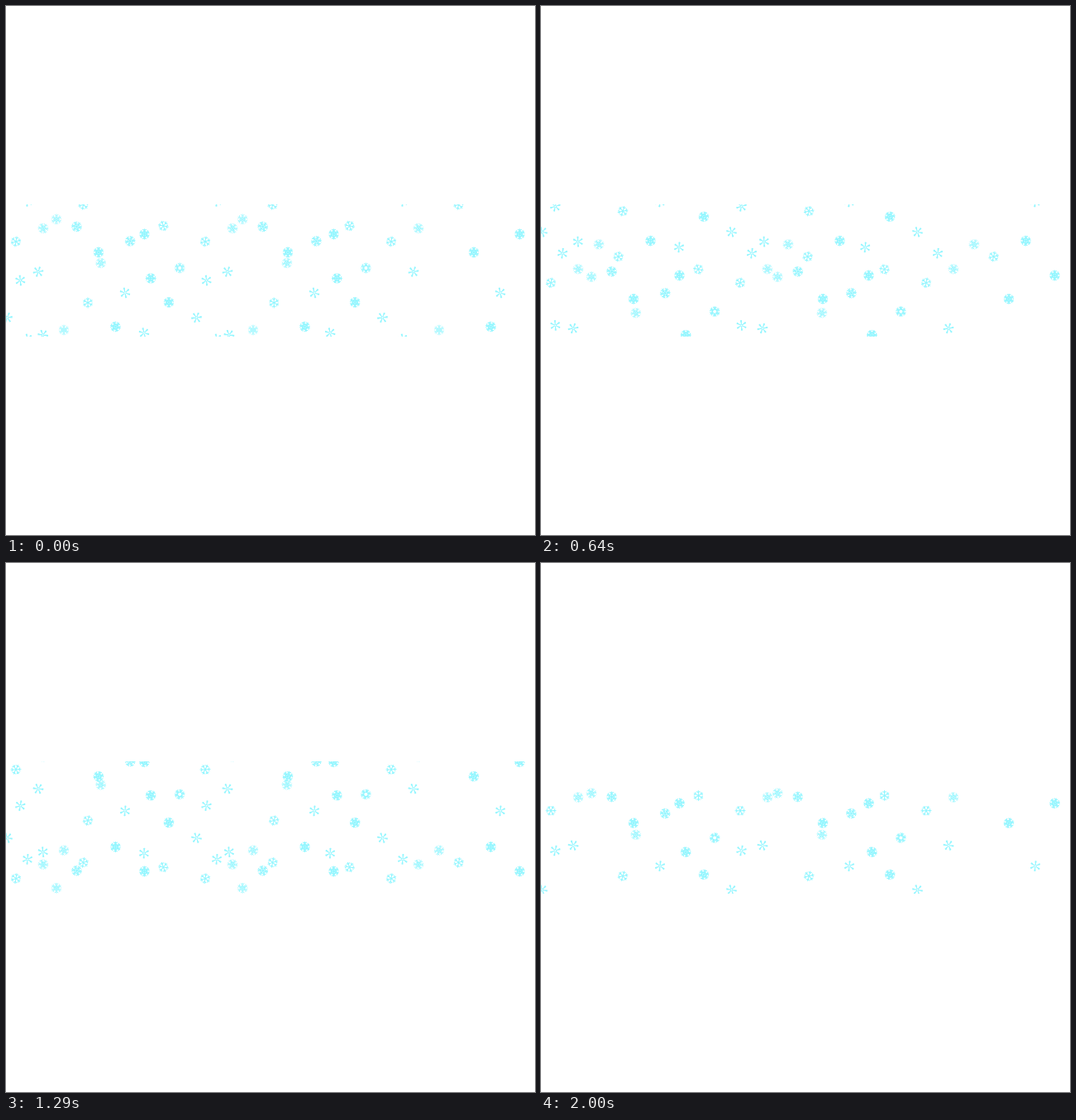
Recreate the animation shown at these times as an HTML page with a canvas. Size 640 by 640 pixels, loop 2.07 s.

```html
<!DOCTYPE html>
<html>
<head>
<meta charset="utf-8">
<style>
html, body { margin: 0; width: 100%; height: 100%; overflow: hidden; background: #fff; }
canvas { display: block; }
</style>
</head>
<body>
<canvas id="stage" width="640" height="640"></canvas>
<script>
const ctx = document.getElementById('stage').getContext('2d');
const LOOP = 2070, STEP = 500 / 7, CYCLE = 45, SPIN = 3.6;

// Each flake: x, y at the start, fall per tick, kind, angle in degrees
const tripled = [
  [1.5, 377, 3.7, 'spokes', 23],
  [12, 285, 2.93, 'branched', 11],
  [26, 402.8, 3.7, 'spokes', 48],
  [39, 321.5, 4.03, 'spokes', 19],
  [45, 269, 2.9, 'lacy', 36],
  [70, 392, 3.7, 'lacy', 0],
  [93.6, 406.8, 3.7, 'branched', -5],
  [112, 298, 3.32, 'dense', 0],
  [132.5, 388, 3.71, 'dense', 43],
  [144, 347, 3.93, 'spokes', 48],
  [167.5, 276, 2.94, 'dense', 0]
];
const doubled = [
  [17.3, 332, 3.2, 'spokes', -6],
  [44.7, 398, 4.03, 'spokes', 38],
  [61, 258, 4.1, 'lacy', 1],
  [85.5, 267, 3.19, 'star', 42],
  [99, 359, 3.957, 'branched', -1],
  [114.7, 311, 3.55, 'lacy', 20],
  [150.2, 284.5, 3.7, 'star', 20],
  [167, 395.5, 3.7, 'spokes', 46],
  [175.2, 329.5, 4.03, 'dense', 30],
  [190.4, 266, 3.09, 'branched', 41],
  [197, 358.5, 3.7, 'dense', 0],
  [210.2, 317, 3.1, 'ring', 0]
];

// Per kind: line width, inner start, distances of the side twigs, hexagon radius
const kinds = {
  spokes: [1.1, 0.8, [], 0],
  branched: [1, 0, [3.7], 0],
  star: [1, 0, [2, 4.2], 0],
  dense: [1.1, 0, [2, 4.2], 3],
  lacy: [0.7, 0, [2, 4.2], 2.4],
  ring: [0.95, 1.8, [2.4, 4.2], 3]
};

function makePath([, inner, twigs, hexagon]) {
  const path = new Path2D();
  const polar = (r, a) => [r * Math.sin(a), -r * Math.cos(a)];
  const line = (p, q) => { path.moveTo(...p); path.lineTo(...q); };
  for (let i = 0; i < 6; i++) {
    const a = i * Math.PI / 3;
    line(polar(inner, a), polar(6.4, a));
    for (const r of twigs)
      for (const side of [-0.38, 0.38]) line(polar(r, a), polar(r + 1.9, a + side));
    if (!twigs.length)
      for (const side of [-0.1, 0.1]) line(polar(3, a), polar(6.2, a + side));
    if (hexagon) line(polar(hexagon, a), polar(hexagon, a + Math.PI / 3));
  }
  return path;
}
const paths = {};
for (const kind in kinds) paths[kind] = makePath(kinds[kind]);

function drawFlake(x, y, kind, angle) {
  if (y < 231 || y > 409) return;
  ctx.save();
  ctx.translate(x, y);
  ctx.rotate(angle * Math.PI / 180);
  ctx.lineWidth = kinds[kind][0];
  ctx.stroke(paths[kind]);
  ctx.restore();
}

function drawGroup(flakes, offsets, tick) {
  for (const [x, y, speed, kind, angle] of flakes)
    for (const dx of offsets)
      for (const age of [tick, tick - CYCLE])
        drawFlake(x + dx, y + speed * age, kind, angle + SPIN * age);
}

function frame(now) {
  const step = Math.min(28, Math.floor((now % LOOP + 5) / STEP));
  const tick = Math.ceil(step * 25 / 14);
  ctx.fillStyle = '#fff';
  ctx.fillRect(0, 0, 640, 640);
  ctx.save();
  ctx.beginPath();
  ctx.rect(0, 240, 640, 160);
  ctx.clip();
  ctx.strokeStyle = '#92f6ff';
  drawGroup(tripled, [0, 229, 454], tick);
  drawGroup(doubled, [0, 225.2], tick);
  ctx.restore();
}

const start = performance.now();
function loop() {
  frame(performance.now() - start);
  requestAnimationFrame(loop);
}
loop();
</script>
</body>
</html>
```
